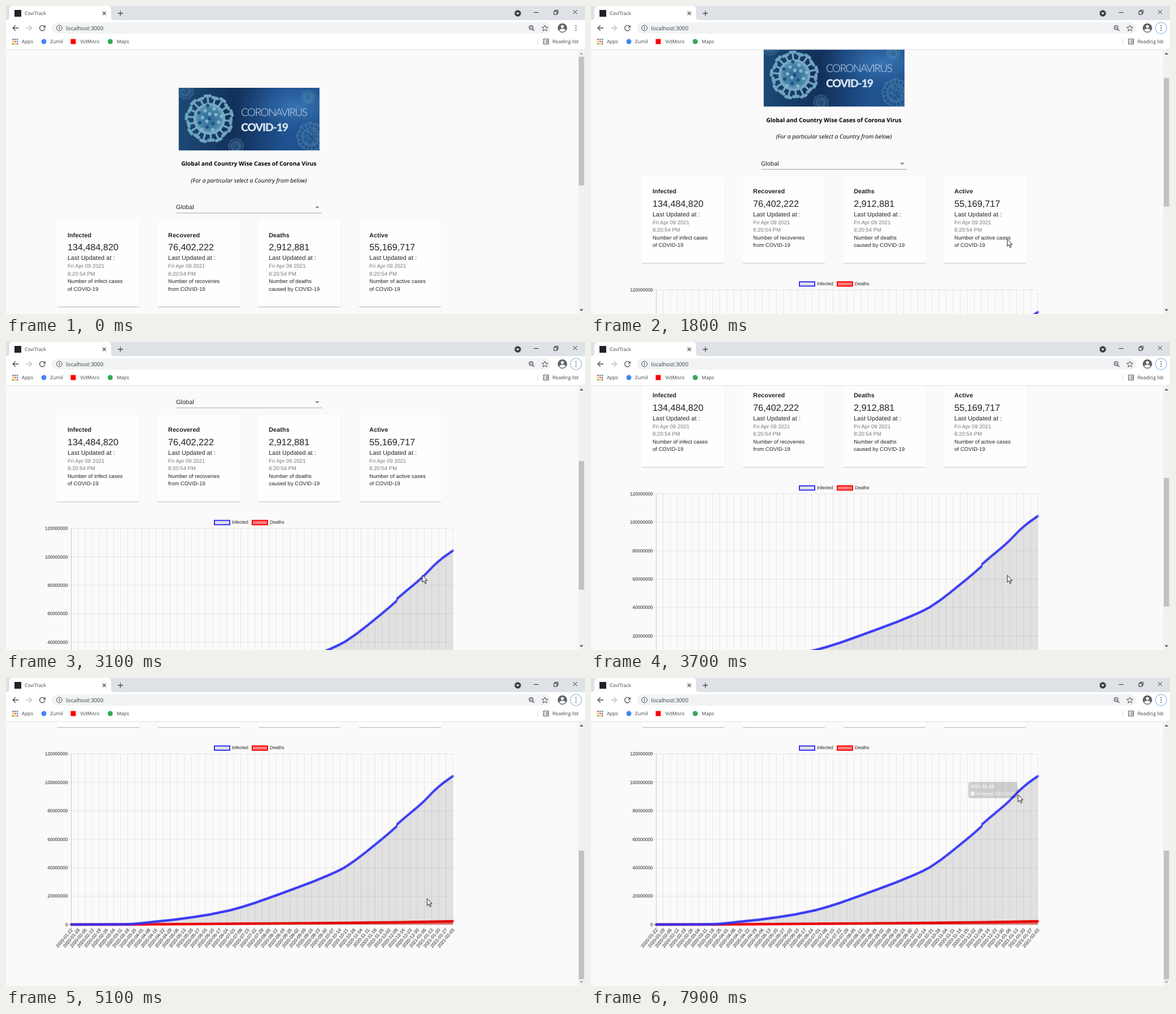
These frames come from a looping animation (1025x546 px, 8 s). An HTML page:

```html
<!DOCTYPE html>
<html lang="en">
<head>
<meta charset="utf-8">
<title>CoviTrack</title>
<style>
html, body { margin: 0; width: 100%; height: 100%; overflow: hidden; background: #fafafa; }
svg { display: block; width: 100vw; height: 100vh; }
text { white-space: pre; text-rendering: geometricPrecision; }
.ui { font: 8.6px "Open Sans", sans-serif; fill: #3c4043; }
.head { font: 10.3px "Open Sans", sans-serif; text-anchor: middle; }
.card { font-family: "Liberation Sans", Arial, sans-serif; fill: #212121; }
.body1 { font-size: 10.8px; letter-spacing: .1px; }
.body2 { font-size: 9.45px; letter-spacing: .05px; }
.chart { font: 8.1px "Liberation Sans", Arial, sans-serif; fill: #666; stroke: #666; stroke-width: .3px; }
.banner { font-family: Lato, sans-serif; fill: #d3e0ec; }
.icon { fill: none; stroke: #4a4d51; stroke-width: 1.3; }
</style>
</head>
<body>
<svg id="stage" viewBox="0 0 1025 546"></svg>
<script>
const LOOP = 8000, MAX_SCROLL = 446;
const BLUE = '#3333ff';

const text = (x, y, s, attrs = '') => `<text x="${x}" y="${y}" ${attrs}>${s}</text>`;
const rect = (x, y, w, h, fill, attrs = '') =>
  `<rect x="${x}" y="${y}" width="${w}" height="${h}" fill="${fill}" ${attrs}/>`;
const circle = (x, y, r, fill, attrs = '') => `<circle cx="${x}" cy="${y}" r="${r}" fill="${fill}" ${attrs}/>`;
const path = (d, attrs = '') => `<path d="${d}" ${attrs}/>`;
const range = n => [...Array(n).keys()];

// Piecewise linear interpolation through [position, ...values] keys.
function track(keys, t) {
  if (t <= keys[0][0]) return keys[0].slice(1);
  const i = keys.findIndex(k => k[0] > t);
  if (i < 0) return keys[keys.length - 1].slice(1);
  const a = keys[i - 1], b = keys[i], k = (t - a[0]) / (b[0] - a[0]);
  return a.slice(1).map((v, j) => v + (b[j + 1] - v) * k);
}

function virus(x, y, r, opacity) {
  const spikes = range(18).map(i => {
    const a = i * Math.PI / 9 + .1, len = r * (i % 2 ? 1.45 : 1.36);
    const dx = Math.cos(a), dy = Math.sin(a), cap = r * .15;
    const cx = x + dx * len, cy = y + dy * len;
    return `<g stroke="#74a9c4" stroke-linecap="round">
      ${path(`M${x} ${y}L${cx} ${cy}`, `stroke-width="${r * .13}"`)}
      ${path(`M${cx - dy * cap} ${cy + dx * cap}L${cx + dy * cap} ${cy - dx * cap}`, `stroke-width="${r * .2}"`)}</g>`;
  }).join('');
  const bumps = range(16).map(i => {
    const a = i * 2.4, d = r * .22 * Math.sqrt(i);
    return circle(x + Math.cos(a) * d, y + Math.sin(a) * d, r * .11, i % 3 ? '#8dbbd0' : '#1f557f');
  }).join('');
  return `<g opacity="${opacity}">${spikes}${circle(x, y, r, 'url(#ball)')}${bumps}</g>`;
}

function banner() {
  return `<g clip-path="url(#bannerClip)">${rect(305.5, 145, 249.5, 111, 'url(#sky)')}
    ${rect(305.5, 145, 249.5, 111, 'url(#glow)')}
    ${virus(535, 161, 8, .35)}${virus(540, 232, 17, .3)}${virus(407, 248, 9, .4)}${virus(318, 150, 10, .3)}
    ${virus(360, 200, 28, .95)}
    <g class="banner">${text(416, 194.5, 'CORONAVIRUS', 'font-size="19" font-weight="300" letter-spacing="-1.5"')}
    ${text(416, 221.5, 'COVID-19', 'font-size="19.5" font-weight="900" letter-spacing="-1.2"')}</g></g>`;
}

function card(i, title, count, line1, line2) {
  const x = 90 + i * 178.1, tx = x + 19;
  return rect(x, 379.5, 146.5, 153.5, '#fefefe', 'rx="2.7" filter="url(#shadow)"') +
    `<g class="card">${text(tx, 409.6, title, 'class="body1" font-weight="bold"')}
    ${text(tx, 433.4, count, 'font-size="16.2"')}
    ${text(tx, 450, 'Last Updated at :', 'class="body1"')}
    <g class="body2">${text(tx, 464.1, 'Fri Apr 09 2021', 'fill="#767676"')}
    ${text(tx, 477.6, '8:20:54 PM', 'fill="#767676"')}
    ${text(tx, 491.1, line1)}${text(tx, 504.6, line2)}</g></g>`;
}

// Chart: days since 2020-01-22 against millions of cases.
const LEFT = 115.5, RIGHT = 791, TOP = 580.5, ZERO = 883, DAYS = 378;
const infected = [[0, 0], [45, .1], [56, .2], [63, .47], [71, 1.02], [84, 2.06], [101, 3.3], [120, 5.1], [137, 7],
  [158, 10.1], [170, 12.5], [182, 15.2], [201, 20], [221, 25.2], [239, 30], [256, 35], [264, 37.6], [271, 40.2],
  [282, 45.5], [291, 50.4], [299, 55], [308, 60.2], [316, 65], [322, 68.8], [323, 70.6], [331, 75.5],
  [339, 80.2], [345, 83.8], [350, 87.1], [359, 93.7], [364, 96.9], [369, 99.8], [378, 104.3]];
const deaths = [[0, 0], [60, .01], [100, .24], [250, 1], [330, 1.65], [378, 2.27]];
const px = day => LEFT + (RIGHT - LEFT) * day / DAYS;
const py = millions => ZERO - (ZERO - TOP) * millions / 120;

function series(data, color, fill) {
  const pts = range(DAYS + 1).map(d => [px(d).toFixed(2), py(track(data, d)[0]).toFixed(2)]);
  const line = 'M' + pts.join('L');
  const dots = pts.map(([x, y]) => `M${x - 2} ${y}a2 2 0 1 0 4 0a2 2 0 1 0-4 0`).join('');
  return path(`${line}V${ZERO}H${LEFT}z`, `fill="${fill}"`) +
    path(line, `fill="none" stroke="${color}" stroke-width="2"`) +
    path(dots, `fill="${fill}" stroke="${color}" stroke-width=".7"`);
}

function chart() {
  const grid = (d, zero) => path(d, `stroke="#000" stroke-opacity="${zero ? .25 : .1}" stroke-width=".8"`);
  const rows = range(7).map(i => {
    const y = py(i * 20);
    return grid(`M${LEFT - 6.7} ${y}H${RIGHT}`, !i) + text(109.5, y + 2.8, i * 20000000, 'text-anchor="end"');
  }).join('');
  const cols = range(55).map(i => {
    const x = px(i * 7);
    const date = new Date(Date.UTC(2020, 0, 22 + i * 7)).toISOString().slice(0, 10);
    return grid(`M${x} ${TOP}V${ZERO + 6.7}`, !i) +
      text(0, 2.8, date, `text-anchor="end" transform="translate(${x + 1} ${ZERO + 8}) rotate(-50)"`);
  }).join('');
  const key = (x, label, color, fill) =>
    rect(x + 1, 566.5, 27, 7.5, fill, `stroke="${color}" stroke-width="2"`) + text(x + 32, 572.3, label);
  return `<g class="chart">${rows}${cols}
    ${key(368, 'Infected', BLUE, 'rgba(0,0,0,.1)')}${key(435, 'Deaths', 'red', 'rgba(255,0,0,.5)')}</g>
    ${series(deaths, 'red', 'rgba(255,0,0,.5)')}${series(infected, BLUE, 'rgba(0,0,0,.1)')}`;
}

function tooltip() {
  return `<g id="tip" font-family="Liberation Sans, Arial, sans-serif" font-size="8.1">
    ${path('M672 630.5H750.5q4 0 4 4V641l4.5 4-4.5 4V655q0 4-4 4H672q-4 0-4-4V634.5q0-4 4-4z', 'fill-opacity=".8"')}
    ${text(672, 641, '2021-01-16', 'fill="#fff" font-weight="bold"')}
    ${rect(672, 647, 7.5, 7.5, '#d8d8d8', `stroke="${BLUE}" stroke-width=".8"`)}
    ${text(682.5, 653.5, 'Infected: 94413500', 'fill="#fff"')}</g>`;
}

function page() {
  return `${banner()}
    <g class="head">${text(430, 283, 'Global and Country Wise Cases of Corona Virus', 'font-weight="bold"')}
    ${text(430, 312.8, '(For a particular select a Country from below)', 'font-style="italic"')}</g>
    ${text(301, 360.3, 'Global', 'class="card body1"')}
    ${path('M547.5 355.5h7l-3.5 3.5z', 'fill="#757575"')}${rect(301, 366.6, 258, .8, '#8f8f8f')}
    ${card(0, 'Infected', '134,484,820', 'Number of infect cases', 'of COVID-19')}
    ${card(1, 'Recovered', '76,402,222', 'Number of recoveries', 'from COVID-19')}
    ${card(2, 'Deaths', '2,912,881', 'Number of deaths', 'caused by COVID-19')}
    ${card(3, 'Active', '55,169,717', 'Number of active cases', 'of COVID-19')}
    ${chart()}${tooltip()}`;
}

function browser() {
  const colors = ['#ea4335', '#fbbc04', '#34a853', '#4285f4'];
  const apps = range(9).map(i =>
    rect(11 + i % 3 * 3.9, 58 + (i / 3 | 0) * 3.9, 2.5, 2.5, colors[i * 3 % 4])).join('');
  const menu = [-4, 0, 4].map(d => circle(1009, 39 + d, 1.1, '#5f6368')).join('');
  return `${rect(0, 0, 1025, 25, '#dee1e6')}${rect(0, 25, 1025, 52, '#fff')}${rect(0, 76.7, 1025, .8, '#d8dade')}
    ${path('M0 25q6 0 6-6V6q0-6 6-6H180q6 0 6 6V19q0 6 6 6z', 'fill="#fff"')}
    ${rect(15, 7, 12, 12, '#20232a')}
    ${rect(81, 29, 884, 20, '#f1f3f4', 'rx="10"')}
    <g class="ui">${text(33, 16, 'CoviTrack')}
    ${text(106.5, 42.6, 'localhost:3000', 'font-size="9.8"')}
    ${text(28, 66, 'Apps')}${text(78, 66, 'Zumil')}${text(131.5, 66, 'VidMoro')}${text(196, 66, 'Maps')}
    ${text(967.5, 66, 'Reading list')}</g>
    ${apps}${circle(67, 63, 4.5, '#4285f4')}${rect(114.5, 58.5, 9, 9, '#f00')}${circle(184.5, 63, 4.5, '#34a853')}
    ${rect(941, 57, .8, 12, '#d0d3d7')}
    <g class="icon">
      ${path('M171 10l6 6m0-6l-6 6M198 13h9m-4.5-4.5v9')}
      ${path('M22 39H12m4.8-4.8L12 39l4.8 4.8')}
      ${path('M35.5 39h10m-4.8-4.8l4.8 4.8-4.8 4.8', 'stroke="#bbbec2"')}
      ${path('M68.3 36.5A4.7 4.7 0 1 0 69 40M69.3 34v3.8h-3.8')}
      ${circle(94.5, 39, 4.9, 'none', 'stroke-width="1"')}${path('M94.5 38.3v3.4M94.5 36v1.2')}
      ${circle(929.5, 38.2, 3.3, 'none')}${path('M932 40.7l3.3 3.3M928 38.2h3')}
      ${path('M954 34l1.5 3.6 3.9.3-3 2.5 1 3.8-3.4-2.1-3.4 2.1 1-3.8-3-2.5 3.9-.3z', 'stroke-width="1"')}
      ${path('M934.5 11.5h8M1004 7l7 7m0-7l-7 7M970 9.5h5.5v5.5H970zM971.7 9.2V7.5h5.5V13h-1.5', 'stroke="#222" stroke-width="1"')}
      ${path('M951.5 58.5h9v9h-9zM953 61h1m1.5 0h4M953 63h1m1.5 0h4M953 65h1m1.5 0h4', 'stroke-width="1"')}
    </g>
    ${circle(906, 13, 5.7, '#3c4043')}${path('M903 11.7h6l-3 3.6z', 'fill="#fff"')}
    ${circle(985, 39, 8.3, '#5f6368')}${circle(985, 36.4, 2.6, '#fff')}
    ${path('M979.5 43.7q0-3.5 5.5-3.5t5.5 3.5q-5.5 4-11 0z', 'fill="#fff"')}
    ${circle(1009, 39, 10, '#fff', 'id="ring" stroke="#a9c8f5" stroke-width="1.5"')}${menu}`;
}

const stage = document.getElementById('stage');
stage.innerHTML = `<defs>
    <linearGradient id="sky"><stop offset="0" stop-color="#1c4a75"/><stop offset=".4" stop-color="#12305a"/>
      <stop offset=".75" stop-color="#1f5290"/><stop offset="1" stop-color="#1f518c"/></linearGradient>
    <radialGradient id="glow" cx=".84" cy=".3" r=".45"><stop offset="0" stop-color="#4a8bcb" stop-opacity=".6"/>
      <stop offset="1" stop-color="#2c65a5" stop-opacity="0"/></radialGradient>
    <radialGradient id="ball"><stop offset="0" stop-color="#2f6f9b"/><stop offset=".7" stop-color="#4a89ae"/>
      <stop offset="1" stop-color="#8fbdd2"/></radialGradient>
    <clipPath id="bannerClip"><rect x="305.5" y="145" width="249.5" height="111"/></clipPath>
    <filter id="shadow" x="-5%" y="-5%" width="110%" height="110%">
      <feDropShadow dx="0" dy=".8" stdDeviation=".6" flood-opacity=".35"/></filter>
  </defs>
  ${rect(0, 0, 1025, 546, '#fafafa')}
  <g id="page">${page()}</g>
  ${rect(1012.5, 77, 12.5, 469, '#f1f1f1')}${rect(1014, 90, 9.5, 228, '#c1c1c1', 'id="thumb"')}
  ${path('M1015.5 86h6.4l-3.2-3.6z', 'id="up"')}${path('M1015.5 537.5h6.4l-3.2 3.6z', 'id="down"')}
  ${browser()}
  ${path('M0 0V12.5l2.9-2.7 2.1 4.7 2-.9-2.1-4.5H8.8z', 'id="cursor" fill="#fff" stroke="#000" stroke-width=".9"')}`;

const parts = {};
for (const id of ['page', 'thumb', 'up', 'down', 'ring', 'cursor', 'tip']) parts[id] = document.getElementById(id);

const scrollKeys = [[1290, 0], [1800, 77.5], [2600, 199], [3700, 311.5], [4950, MAX_SCROLL]];
const cursorKeys = [[900, 1009, 39], [1300, 737, 413.5], [4800, 737, 413.5], [5100, 745.5, 391], [5500, 745.5, 391],
  [6400, 763.5, 198.5], [7300, 763.5, 198.5], [7800, 756, 207]];
const arrowColor = off => off ? '#a3a3a3' : '#505050';

function draw() {
  const t = Math.floor(performance.now() / 100) * 100 % LOOP;
  const [scroll] = track(scrollKeys, t);
  const shown = t >= 900 ? 'visible' : 'hidden';
  parts.page.setAttribute('transform', `translate(0 ${-scroll})`);
  parts.thumb.setAttribute('y', 90 + scroll * 216 / MAX_SCROLL);
  parts.up.setAttribute('fill', arrowColor(scroll === 0));
  parts.down.setAttribute('fill', arrowColor(scroll === MAX_SCROLL));
  parts.ring.setAttribute('visibility', shown);
  parts.cursor.setAttribute('visibility', shown);
  parts.cursor.setAttribute('transform', `translate(${track(cursorKeys, t)})`);
  parts.tip.setAttribute('opacity', track([[7800, 0], [7900, .22]], t)[0]);
  requestAnimationFrame(draw);
}
draw();
</script>
</body>
</html>
```
